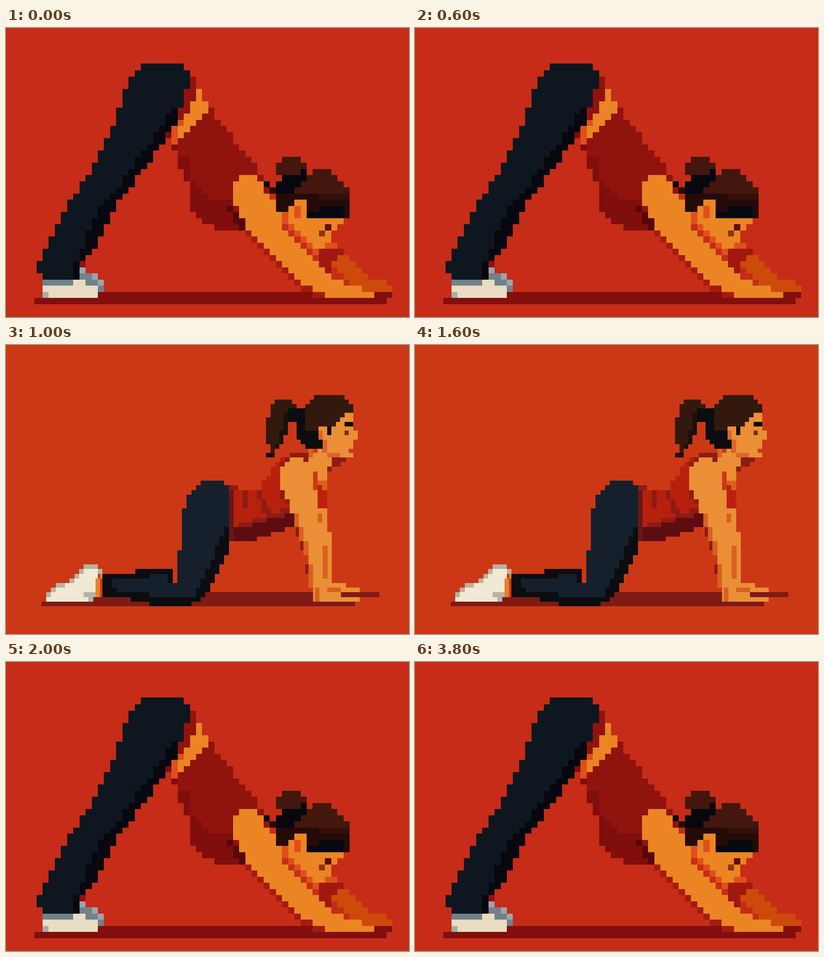
These frames come from a looping animation (882 by 635 pixels, 5 s). An HTML page with a canvas:

```html
<!DOCTYPE html>
<html lang="en">
<head>
<meta charset="utf-8">
<title>Stretch loop</title>
<style>
  html, body { margin: 0; width: 100%; height: 100%; overflow: hidden; background: #c62c17; }
  canvas { display: block; }
</style>
</head>
<body>
<canvas id="stage" width="882" height="635"></canvas>
<script>
const ctx = document.getElementById('stage').getContext('2d');

function fillStage(color) {
  ctx.fillStyle = color;
  ctx.fillRect(0, 0, 882, 635);
}

// A mosaic grid: poly() turns an outline into stair-stepped rows of cells.
function mosaic(toX, toY) {
  function box(color, x, y, w, h) {
    const left = Math.round(toX(x)), top = Math.round(toY(y));
    ctx.fillStyle = color;
    ctx.fillRect(left, top, Math.round(toX(x + w)) - left, Math.round(toY(y + h)) - top);
  }
  function poly(color, outline) {
    const v = outline.split(' ').map(Number);
    const corners = v.flatMap((x, i) => i % 2 ? [] : [{ x, y: v[i + 1] }]);
    const ys = corners.map(c => c.y);
    for (let row = Math.floor(Math.min(...ys)); row < Math.max(...ys); row++) {
      const mid = row + 0.5;
      const hits = corners.flatMap((a, i) => {
        const b = corners[(i + 1) % corners.length];
        return (a.y <= mid) === (b.y <= mid) ? [] : [a.x + (mid - a.y) / (b.y - a.y) * (b.x - a.x)];
      }).sort((a, b) => a - b).map(Math.round);
      for (let i = 0; i + 1 < hits.length; i += 2) box(color, hits[i], row, hits[i + 1] - hits[i], 1);
    }
  }
  return { box, poly };
}

// The topmost row of the first pose is slightly taller than the rest.
const dog = mosaic(x => 13.44 * x - 0.6, y => 13.5 * y + 80.5 - 2.5 / (1 + y * y));
const cow = mosaic(x => 10.24 * x + 78, y => 10.22 * y + 247);
const cowHead = mosaic(x => 9.55 * x + 569, y => 9.8 * y + 110);

function drawDog() {
  const { box, poly } = dog;
  const skin = '#eb8423', bright = '#df4f1d', floor = '#820e0e', black = '#07080f';
  fillStage('#c62c17');
  box(floor, 15, 37, 47.9, 1);
  box(floor, 4.65, 38, 57.35, 1);

  const back = '26 11 30 2 31 2 31 4 33.2 7 42 18.3 43 22';
  poly('#7f0e0d', back + ' 39 24 39 27 34.5 27 30 24 29.6 19');
  poly('#91130d', back + ' 43 24 37 24 37 22 33 22 31 19 30 19 30 15 28 15 28 13');
  poly('#570709', '36 23 37 23 39 26 39 27 38 27');
  poly(skin, '31.3 4 32 4 32 6 33 6 33 8 28.6 12 27.6 12');
  box(bright, 28, 9, 1, 1);
  box(bright, 27, 10, 1, 3);

  const calf = ' 27.5 10 19 22 18.5 22 14.4 30 12 33 12 35 ';
  poly('#0e1720', '22.4 0 29 0 29 1 30 1 30 4 29.4 4' + calf + '6 35 6 34 4.5 34 10.5 22 13.5 18 17.5 10 20.2 2');
  poly(black, '27.4 7 28 7' + calf + '11 35 11 33 12.4 30 15.4 23 16.6 22.4');

  box('#970d12', 12, 32, 1, 1);
  poly('#71828a', '12 34 15 34 15 35 16 35 16 37 6 37 6 35 12 35');
  for (const [x, y] of [[12, 33], [14, 34], [15, 35]]) box('#9aa6aa', x, y, 1, 1);
  poly('#eadcc2', '6 36 11 36 11 35 13 35 13 36 15 36 15 38 6 38');
  box('#a5aeae', 6, 37, 1, 1);

  poly('#a0180f', '50 30 55 30 55 31 54 31 53 34 52 34');
  poly('#cd4a0b', '54 31 56 31 59 34.6 63 36 63 37 58 37 53 33 53 32');
  poly('#a51b10', '38.5 27 39.5 27 49 36 53 38 51 38 47.5 36');
  poly(skin, '38 18 40.6 18 43.8 22.5 45.2 26.5 53.5 35 60 37.3 60 38 53 38 49 36 48.5 36 39.5 27 37.5 23 37 23 37 19 38 19');

  poly(skin, '46 23 47 22 49 22 49 24 55 24 55 26 53 27.5 53 30 50 30 46 25');
  poly(bright, '45 24 46 24 46 26 51 31 50 31 45 26');
  box(bright, 47, 23, 1, 2);
  box(bright, 52, 29, 2, 1);
  box('#600c08', 52, 26, 1, 1);
  box('#8e350d', 51, 27, 1, 1);

  box(black, 42, 19, 1, 1);
  poly('#250b07', '43 20 56 20 56 25 49 25 49 22 47 22 45 25 44 23 44 21 43 21');
  poly(black, '46 17 49 17 49 18.5 46 21 44 21 44 19');
  box('#43170d', 45, 15, 3, 1);
  poly('#43170d', '44 16 49 16 49 17 47 18 44 18');
  poly('#43170d', '50.5 17 52.5 17 56 20.5 56 21 47 21 47 20.5');
  box('#35100a', 51, 21, 5, 1);
  box(black, 49, 24, 6, 1);
  box(black, 51, 23, 4, 1);
}

function drawCowHead() {
  const { box, poly } = cowHead;
  const hair = '#33190d', black = '#0c0d0f', bright = '#dd642a';
  poly('#ea8f35', '18 4 20 4 20 8 21 8 21 10 20 10 20 14 15 14 13 11 12 10 12 7 16 7');
  box(bright, 12, 8, 1, 2);
  box(bright, 13, 10, 1, 3);
  box(bright, 14, 13, 3, 1);
  box('#c63a20', 19, 12, 1, 1);
  box('#7b2d14', 18, 8, 1, 1);

  poly(black, '4 3 9 3 9 8 12 8 12 10 13 10 13 11 12 12 9 12 7 10 7 6 5 6');
  poly(hair, '12 0 17.6 0 20 2 20 4 18.5 4 15.5 7 12 7 12 8 9 8 9 2');
  box(black, 14, 7, 1, 2);
  box(black, 18, 6, 2, 1);
  poly('#1b100b', '4 4 5 4 5 7 4 10 1.5 14 0 14 1 11');
  poly(hair, '2 1 5.5 1 6.5 2 6.5 3 5 3 4 5 4 7 2 12 1 13 1 11 0 11 0 5 1 5 1 2 2 2');
}

function drawCow() {
  const { box, poly } = cow;
  const skin = '#ea8f35', bright = '#d9601f', dark = '#8d1c14', floor = '#7f1a14';
  fillStage('#cc3815');
  box(floor, 0, 31, 67, 1);
  box(floor, 9, 30, 59, 1);
  box(floor, 35, 29, 23, 1);
  box(floor, 64, 29, 8.2, 1);

  poly('#b7b3a2', '9.5 23 12 23 12 24 13 24 13 25 12 25 12 30 9 31 1 31 1 29 4 27 5.5 27');
  poly('#f1e9d3', '9.3 24 12 24 12 28 9 31 1 31 1 30 3.5 28 6.5 27');
  box('#b7b3a2', 9, 29, 2.5, 1);
  box('#e5812c', 12.5, 25, 1, 1);
  box('#e5812c', 11.5, 26, 1, 4);

  const thigh = '29 27 29 20 30 20 30.4 11 31 8 34.6 5 39 5 39 6 40 6 ';
  poly('#0b0d11', thigh + '40 21 39.6 21 35.4 29 31.6 32 23 32 23 31 18.5 31 18.5 30 12.5 30 12.5 25 19.5 25 19.5 24 28 24 28 27');
  poly('#15202c', thigh + '39.5 15 32.8 30 23 30 23 29 17 29 15 28 15 26 22.5 26 22.5 25 27 25 27 26.5');

  poly('#b8200e', '40 6 42 6 42 7 46.5 7 49.5 2 52 0 56 1 58 3 54 15 44 18 40 18');
  poly(dark, '53 -1 56 -1 58 1 58 3 54 12 52 9 50.5 8 50.5 2 53 0');
  poly(dark, '42 14 47 13 52 11 54 12 41 16');
  poly('#5d0c11', '41 15.5 54 12 54 15 44 18 41 18');
  box('#621a17', 40, 7, 1, 11);
  box(dark, 40, 6, 2, 1);
  box(dark, 43, 7, 1, 4);
  poly(dark, '45.5 7 46.5 7 48.5 11 48.5 12 47.5 12');

  poly(bright, '57 -2 59 -1 62 0 62 2 60.5 5 61 11 60 12 59 4 57 0');
  poly(skin, '59 -2 61 -1 62 2 60 6 59 4 57 1');
  poly(dark, '62 0 65 0 65 1 61 3');
  poly('#bd210e', '59 6 61 8 61 11 59 12');

  box(dark, 54.3, 15, 1, 2);
  box(dark, 55.3, 18, 1, 2);
  box(dark, 56.3, 23, 1, 2);
  poly(skin, '53 0 55 0 58 3 58 6 59 8 59 11 61 11 61 16 62 16 62 27 65 27 65 28 68 28 68 29 64 29 64 30 68 30 68 31 58.4 31 58.4 28 57 27 57 21 51.3 6 51 2');
  poly(bright, '53.5 12 54.5 12 57.3 21 58 28 57 28 56.5 21');
  box(bright, 60.1, 19, 1, 7);
  box(bright, 61, 28, 3, 1);
  box(bright, 58.4, 28, 1, 3);
  box(bright, 59, 12, 1, 2);
  drawCowHead();
}

let shown = null;
function tick() {
  const t = performance.now() % 5000;
  const pose = t >= 1000 && t < 2000 ? drawCow : drawDog;
  if (pose !== shown) {
    pose();
    shown = pose;
  }
  requestAnimationFrame(tick);
}
tick();
</script>
</body>
</html>
```
